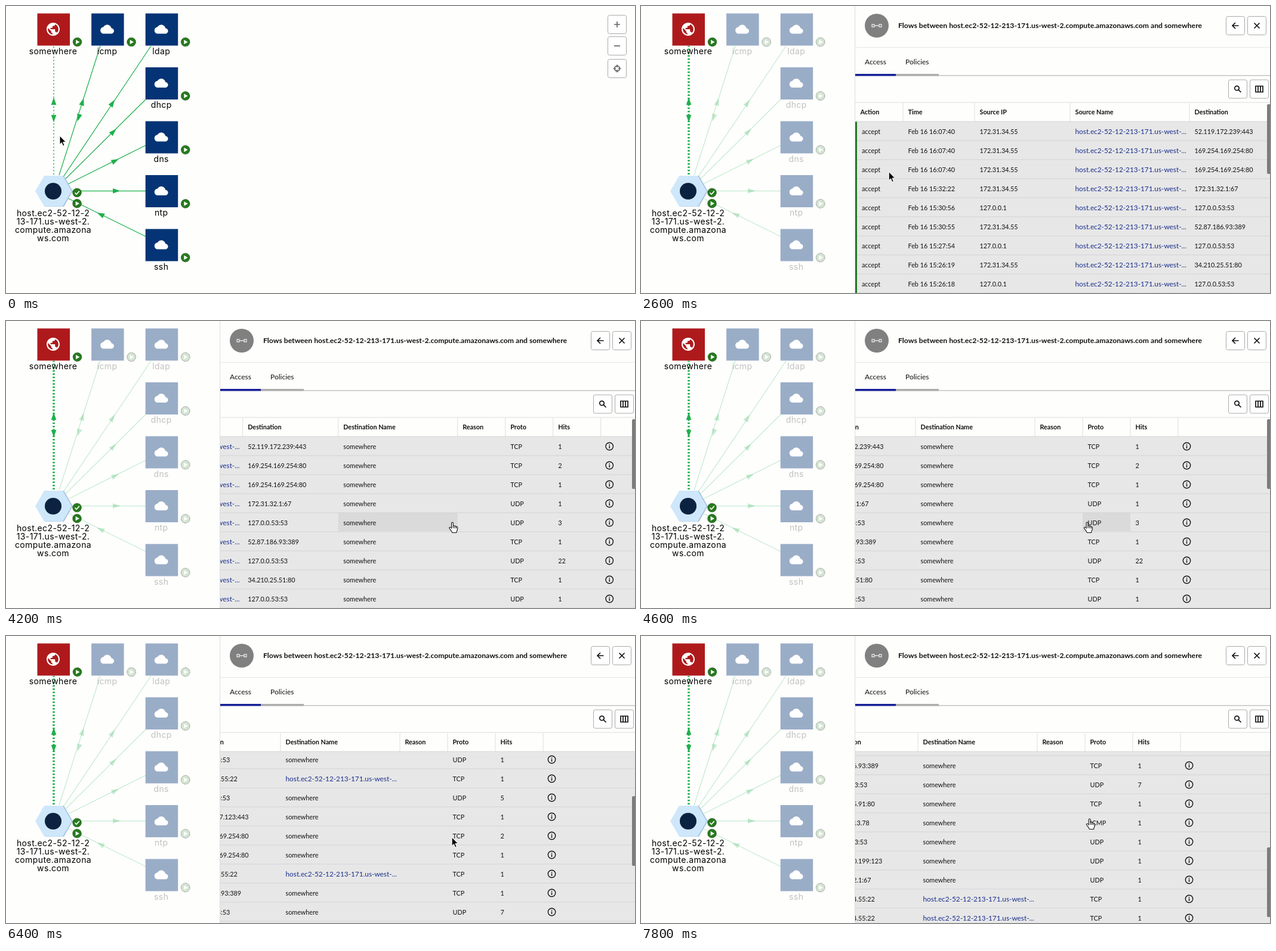
An HTML page for the animation above (8 s loop, 1054x482 px).

```html
<!DOCTYPE html>
<html lang="en">
<head>
<meta charset="utf-8">
<title>Flows between hosts</title>
<style>
  html, body { margin: 0; width: 100%; height: 100%; overflow: hidden; background: #fefefd; }
  #stage { display: block; width: 1054px; height: 482px; font: 10.8px Lato, sans-serif; fill: #111; }
  .label { font: 14px Inter, sans-serif; letter-spacing: .4px; text-anchor: middle; fill: #000; }
  .edge line { stroke: #1fb04c; stroke-width: 1.25; }
  .edge polygon { fill: #1fb04c; }
  .main line { stroke-width: 1.6; stroke-dasharray: 2 3.6; }
  .hover .main line { stroke-width: 4; stroke-dasharray: 3 2.5; }
  .focus .main line { stroke-width: 3.6; stroke-dasharray: 2.6 2.9; }
  .dim .other polygon { opacity: .25; }
  .focus .other line { opacity: .25; }
  .focus .other .box { opacity: .4; }
  .focus .other .label { opacity: .24; }
  .focus .other .badge circle { fill: #d5e5d3; stroke: #777; }
  .badge circle { fill: #267a1d; stroke: #12400d; stroke-dasharray: 1.5 1; }
  .bold { font-weight: bold; }
  .link { font-size: 11.8px; fill: #1a2f8c; }
  .button rect { fill: #fff; stroke: #aaa; }
  .button path, .button circle { fill: none; stroke: #111; stroke-width: 1.7; }
  .zoom path, .zoom circle { stroke: #666; }
</style>
</head>
<body>
<svg id="stage" viewBox="0 0 1054 482"></svg>
<script>
const stage = document.getElementById('stage');
const HOST = 'host.ec2-52-12-213-171.us-west-2.compute.amazonaws.com';
const SHORT_HOST = 'host.ec2-52-12-213-171.us-west-...';
const PANEL_X = 359, BODY_Y = 194, ROW = 32, TABLE_WIDTH = 1314;

// Building blocks
const text = (x, y, value, cls = '') => `<text x="${x}" y="${y}" class="${cls}">${value}</text>`;
const rect = (x, y, w, h, fill, more = '') =>
  `<rect x="${x}" y="${y}" width="${w}" height="${h}" fill="${fill}" ${more}/>`;
const button = (x, y, icon, cls = '') =>
  `<g class="button ${cls}" transform="translate(${x} ${y})">
    <rect x="-15.5" y="-15.5" width="31" height="31" rx="3"/>${icon}</g>`;
const badge = (x, y, icon = '<path d="M-2.4-3.8L4 0L-2.4 3.8Z" fill="#fff"/>') =>
  `<g class="badge" transform="translate(${x} ${y})"><circle r="7.3"/>${icon}</g>`;
const arrow = (x, y, angle) =>
  `<polygon points="-6,-4.3 6.5,0 -6,4.3" transform="translate(${x} ${y}) rotate(${angle})"/>`;

const CLOUD = 'M19.35 10.04C18.67 6.59 15.64 4 12 4 9.11 4 6.6 5.64 5.35 8.04 2.34 8.36 0 10.91 0 14c0 3.31 2.69 6 6 6h13c2.76 0 5-2.24 5-5 0-2.64-2.05-4.78-4.65-4.96z';
const GLOBE = 'M12 2C6.48 2 2 6.48 2 12s4.48 10 10 10 10-4.48 10-10S17.52 2 12 2zm-1 17.93c-3.95-.49-7-3.85-7-7.93 0-.62.08-1.21.21-1.79L9 15v1c0 1.1.9 2 2 2v1.93zm6.9-2.54c-.26-.81-1-1.39-1.9-1.39h-1v-3c0-.55-.45-1-1-1H8v-2h2c.55 0 1-.45 1-1V7h2c1.1 0 2-.9 2-2v-.41c2.93 1.19 5 4.06 5 7.41 0 2.08-.8 3.97-2.1 5.39z';

// Network graph
function edge([x1, y1, x2, y2], arrows, cls = 'other') {
  const angle = Math.atan2(y2 - y1, x2 - x1) * 180 / Math.PI;
  const heads = arrows.map(([x, y, turn = 0]) => arrow(x, y, angle + turn)).join('');
  return `<g class="edge ${cls}"><line x1="${x1}" y1="${y1}" x2="${x2}" y2="${y2}"/>${heads}</g>`;
}

function node(name, col, row, cls = 'other') {
  const x = 80 + col * 90.6, y = 39.5 + row * 90.5, main = cls === 'main';
  return `<g class="${cls}">
    <g class="box">${rect(x - 27.5, y - 27, 54.5, 54, main ? '#ae1a1c' : '#043475')}</g>
    <path d="${main ? GLOBE : CLOUD}" fill="#fff"
      transform="translate(${x - 1} ${y - .5}) scale(${main ? 1.1 : .95}) translate(-12 -12)"/>
    ${text(x - 1, y + 41, name, 'label')}${badge(x + 39.5, y + 21)}</g>`;
}

const hostLines = ['host.ec2-52-12-2', '13-171.us-west-2.', 'compute.amazona', 'ws.com'];
const graph =
  edge([80, 283, 80, 67], [[80, 160], [80, 189, 180]], 'main') +
  edge([89, 284, 158, 67], [[128.3, 161], [121.7, 187.5, 180]]) +
  edge([96, 287, 243, 67], [[178.5, 163]]) +
  edge([99, 291, 234, 157], [[180, 211]]) +
  edge([104, 299, 234, 234], [[183, 260]]) +
  edge([110, 310.5, 234, 310.5], [[185, 310.5]]) +
  edge([104, 323, 234, 387], [[158.5, 350, 180]]) +
  node('somewhere', 0, 0, 'main') + node('icmp', 1, 0) +
  ['ldap', 'dhcp', 'dns', 'ntp', 'ssh'].map((name, i) => node(name, 2, i)).join('') +
  `<path d="M50.5 311L65.5 285H97L112 311L97 337H65.5Z" fill="#a9c5de"/>
   <path d="M49 311L64 285H95L110 311L95 336.5H64Z" fill="#cfe7fb"/>
   <circle cx="79" cy="311" r="14" fill="#0b2340"/>` +
  badge(119, 313.5, '<path d="M-3.5 0L-1 2.8L3.8-2.6" fill="none" stroke="#fff" stroke-width="1.6"/>') +
  badge(119, 331.7) +
  hostLines.map((line, i) => text(79, 352.5 + i * 14, line, 'label')).join('');

const zoomControls =
  button(1024, 31, '<path d="M-5 0H5M0-5V5"/>', 'zoom') +
  button(1024, 67, '<path d="M-5 0H5"/>', 'zoom') +
  button(1024, 105, '<circle r="4.3"/><path d="M-6.5 0H-2M2 0H6.5M0-6.5V-2M0 2V6.5"/>', 'zoom');

// Flow table
const columns = [['Action', 0], ['Time', 80], ['Source IP', 200], ['Source Name', 360], ['Destination', 560],
  ['Destination Name', 720], ['Reason', 920], ['Proto', 1000], ['Hits', 1080], ['', 1160]];
const OWN = '172.31.34.55', LOCAL = '127.0.0.53:53', SSH = OWN + ':22', META = '169.254.169.254:80';
const flows = [
  ['16:07:40', '52.119.172.239:443', 'TCP', 1], ['16:07:40', META, 'TCP', 2],
  ['16:07:40', META, 'TCP', 1], ['15:32:22', '172.31.32.1:67', 'UDP', 1],
  ['15:30:56', LOCAL, 'UDP', 3], ['15:30:55', '52.87.186.93:389', 'TCP', 1],
  ['15:27:54', LOCAL, 'UDP', 22], ['15:26:19', '34.210.25.51:80', 'TCP', 1],
  ['15:26:18', LOCAL, 'UDP', 1], ['15:25:40', SSH, 'TCP', 1],
  ['15:24:31', LOCAL, 'UDP', 5], ['15:24:30', '52.119.167.123:443', 'TCP', 1],
  ['15:23:12', META, 'TCP', 2], ['15:23:12', META, 'TCP', 1],
  ['15:22:50', SSH, 'TCP', 1], ['15:21:44', '52.87.186.93:389', 'TCP', 1],
  ['15:21:43', LOCAL, 'UDP', 7], ['15:20:18', '34.210.25.91:80', 'TCP', 1],
  ['15:19:36', '185.125.13.78', 'ICMP', 1], ['15:19:35', LOCAL, 'UDP', 1],
  ['15:18:20', '85.125.90.199:123', 'UDP', 1], ['15:17:22', '172.31.32.1:67', 'UDP', 1],
  ['15:16:10', SSH, 'TCP', 1], ['15:15:42', SSH, 'TCP', 1], ['15:14:30', LOCAL, 'UDP', 1]];

function flowRow([time, destination, proto, hits], i) {
  const y = i * ROW, base = y + 20.7, inbound = destination === SSH;
  const cells = ['Feb 16 ' + time, destination === LOCAL ? '127.0.0.1' : OWN, SHORT_HOST,
    destination, inbound ? SHORT_HOST : 'somewhere', '', proto, hits];
  return rect(0, y + ROW - .5, TABLE_WIDTH, 1, '#d3d3da') + rect(0, y, 3, ROW, '#217a22') +
    text(11, base, 'accept') +
    cells.map((cell, c) => text(columns[c + 1][1] + 8.5, base, cell, cell === SHORT_HOST ? 'link' : '')).join('') +
    `<g transform="translate(1174.5 ${y + 16.5})"><circle r="6.2" fill="none" stroke="#111" stroke-width="1.4"/>
      <path d="M0-1V3.5M0-3.6V-2.1" stroke="#111" stroke-width="1.4"/></g>`;
}

const header = columns.map(([name, x]) =>
  text(x + 8.5, 19, name, 'bold') + (x ? rect(x - .5, 0, 1, 31, '#ddd') : '')).join('');

const panel = rect(358, 0, 696, 482, '#fefefd') + rect(358, 0, 1, 482, '#ddd') +
  `<circle cx="395" cy="33" r="20" fill="#808080"/>
   <path d="M387 31h4v4h-4zM399 31h4v4h-4zM391 33H399" fill="none" stroke="#e4e4e4" stroke-width="1.3"/>
   <text x="431" y="37.3" class="bold" font-size="12.2">Flows between ${HOST} and somewhere</text>` +
  button(996, 33, '<path d="M5.5 0H-5M0-5L-5 0L0 5"/>') +
  button(1032, 33, '<path d="M-4.5-4.5L4.5 4.5M4.5-4.5L-4.5 4.5"/>') +
  rect(359, 69, 695, 1, '#e6e6e6') +
  '<g font-size="12">' + text(375, 98, 'Access') + text(443, 98, 'Policies') + '</g>' +
  rect(359, 116, 695, 1.5, '#c4c4c4') + rect(427, 114, 72, 3.5, '#aeaeae') + rect(359, 114, 68, 3.5, '#16209a') +
  button(1000, 139.5, '<circle cx="-1.5" cy="-1.5" r="3.7"/><path d="M1.3 1.3L5.5 5.5"/>') +
  button(1036, 139.5, '<path d="M-6-5H6V5H-6ZM-2-5V5M2-5V5"/>') +
  rect(359, 161.5, 695, 1, '#ddd') +
  `<text id="loading" x="708.5" y="339.5" text-anchor="middle" fill="#444"
     style="font:12px Inter,sans-serif">Loading data...</text>
   <g id="table">
     <svg x="${PANEL_X}" y="163" width="695" height="31"><g id="head">${header}</g></svg>
     <svg x="${PANEL_X}" y="${BODY_Y}" width="695" height="288">
       ${rect(0, 0, 695, 288, '#e7e7e7')}
       <g id="body">${rect(0, ROW * 4, 0, ROW - 1, '#dadada', 'id="cell"')}${flows.map(flowRow).join('')}</g>
     </svg>
     ${rect(359, 193.5, 695, 1, '#d6d6d6')}
     ${rect(1049, 165, 7, 117, '#7c7c7c', 'rx="2" id="thumb"')}
   </g>`;

const cursor = `<g id="cursor">
  <path id="pointer" d="M0 0V14.5L3.3 11.4L5.6 17L8 16L5.7 10.6H10.3Z" fill="#000" stroke="#fff"/>
  <path id="hand" d="M-1.8 9V1.5C-1.8-.5 1-.5 1 1.5V6.5C1.5 5.4 3.6 5.5 3.7 7C4.5 6.1 6.2 6.5 6.2 7.8C7.3 7.2 8.5 7.8 8.5 9.2C8.5 13 7 14 6.5 17.5H-.5C-1 15-4.5 12-5.5 9.8C-6 8-3.5 7.5-1.8 10Z
    M1 6.5V10M3.7 7V10.2M6.2 7.8V10.5" fill="#fff" stroke="#111" stroke-width="1.1"/></g>`;

stage.innerHTML = graph + `<g id="zoom">${zoomControls}</g><g id="panel">${panel}</g>` + cursor;

// Motion: keyframes are [time, value]
const tracks = {
  x: [[0, 90], [800, 80.5], [2200, 80.5], [3000, 750], [3600, 750], [4400, 748], [7000, 747], [7400, 752]],
  y: [[0, 218], [800, 219], [2200, 219], [3000, 338], [7000, 338], [7400, 307]],
  scrollX: [[3600, 0], [4400, 619], [6800, 619], [7200, 615]],
  scrollY: [[5200, 0], [5400, 20], [5800, 112], [6400, 259], [7000, 406], [7400, 473]],
};
const smooth = u => u * u * (3 - 2 * u), linear = u => u;

function valueAt(track, t, ease = smooth) {
  const next = track.findIndex(([time]) => time > t);
  if (next === 0) return track[0][1];
  if (next < 0) return track[track.length - 1][1];
  const [t0, a] = track[next - 1], [t1, b] = track[next];
  return a + (b - a) * ease((t - t0) / (t1 - t0));
}

const $ = id => document.getElementById(id);
const show = (id, visible) => $(id).setAttribute('display', visible ? 'inline' : 'none');
const move = (id, x, y) => $(id).setAttribute('transform', `translate(${x} ${y})`);

function highlightCell(contentX) {
  const next = columns.findIndex(([, start]) => start > contentX);
  const left = columns.at(next < 0 ? -1 : next - 1)[1];
  const right = next < 0 ? TABLE_WIDTH : columns[next][1];
  $('cell').setAttribute('x', left);
  $('cell').setAttribute('width', right - left);
}

function render(now) {
  const t = Math.floor(now % 8000 / 200) * 200;
  const x = valueAt(tracks.x, t), y = valueAt(tracks.y, t);
  const scrollX = valueAt(tracks.scrollX, t), scrollY = valueAt(tracks.scrollY, t, linear);

  stage.classList.toggle('hover', t >= 800);
  stage.classList.toggle('dim', t >= 1400);
  stage.classList.toggle('focus', t >= 2200);
  show('zoom', t < 2000);
  show('panel', t >= 2000);
  show('loading', t < 2600);
  show('table', t >= 2600);

  move('head', -scrollX, 0);
  move('body', -scrollX, -scrollY);
  move('thumb', 0, scrollY * .4017);

  const hovering = t >= 3000 && t < 5400;
  show('cell', hovering);
  if (hovering) highlightCell(x - PANEL_X + scrollX);

  const handShown = t >= 800 && t < 2400 || hovering || t >= 7400;
  show('hand', handShown);
  show('pointer', !handShown);
  move('cursor', x, y);
  requestAnimationFrame(render);
}
requestAnimationFrame(render);
</script>
</body>
</html>
```
